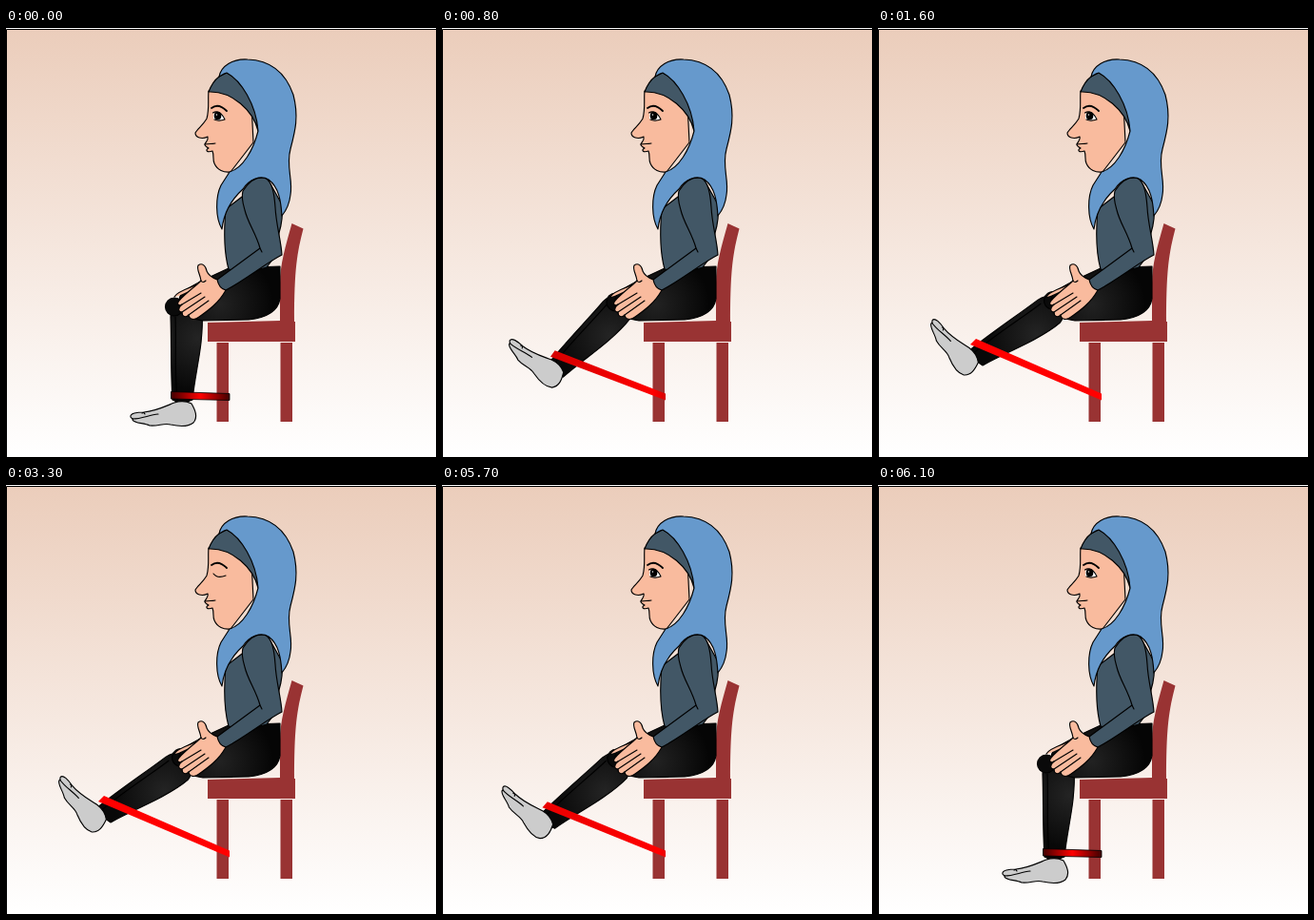
These frames come from a looping animation (452 by 450 pixels, 7.55 s). An HTML page:

```html
<!DOCTYPE html>
<html lang="en">
<head>
<meta charset="utf-8">
<title>Seated knee extension</title>
<style>
  html, body { margin: 0; height: 100%; overflow: hidden; }
  svg { display: block; width: 100vw; height: 100vh; }
  .ink { stroke: #000; stroke-width: 1.15; stroke-linejoin: round; stroke-linecap: round; }
  .bold { stroke-width: 1.8; }
  .line { fill: none; }
  .skin { fill: #f9bb9e; }
  .cloth { fill: #425766; }
  .scarf { fill: #69c; }
  .wood { fill: #933; }
</style>
</head>
<body>
<svg viewBox="0 0 452 450">
  <defs>
    <linearGradient id="sky" x2="0" y2="1">
      <stop stop-color="#ebcdbb"/><stop offset="1" stop-color="#fff"/>
    </linearGradient>
    <radialGradient id="thighShade" gradientUnits="userSpaceOnUse" cx="225" cy="290" r="56">
      <stop stop-color="#222"/><stop offset="1" stop-color="#050505"/>
    </radialGradient>
    <radialGradient id="shinShade" gradientUnits="userSpaceOnUse" cx="202" cy="325" r="56">
      <stop stop-color="#242424"/><stop offset="1" stop-color="#080808"/>
    </radialGradient>
    <linearGradient id="bandShade" gradientUnits="userSpaceOnUse" y1="386" x2="235" y2="386">
      <stop/><stop id="glow" stop-color="#f00"/><stop offset="1"/>
    </linearGradient>
  </defs>

  <rect width="452" height="450" fill="#fff"/>
  <rect y="1" width="452" height="449" fill="url(#sky)"/>
  <path d="M.5 450V1.500H452" fill="none" stroke="#000"/>

  <!-- chair -->
  <g class="wood">
    <path d="M300.500 205L312.500 210.500C306 236 303 252 303 308H304V329H212V309L288 307V268C288 248 294 228 300.500 205Z"/>
    <path d="M221.500 330H234V413H221.500ZM288.500 330H301V413H288.500Z"/>
  </g>

  <!-- moving leg -->
  <g id="shin" class="ink">
    <path fill="url(#shinShade)" d="M186 284C178 285 174 292 173 303C174 330 173 360 175 390C182 394 190 393 196 390C198 370 203 348 205 330C206 320 207 308 206 298C203 288 194 284 186 284Z"/>
    <path class="line" d="M178 303C179 330 177 360 180 390"/>
  </g>
  <circle id="knee" class="ink" cx="177" cy="292.500" r="9.500" fill="#0a0a0a"/>
  <g id="foot" class="ink">
    <path fill="#ccc" d="M177 393C167 397 157 402 145 403C138 403 130 404 131 408C132 410 134 409 133 411C135 415 145 414 151 417C160 418 166 414 173 416C182 418 192 418 197 414C202 408 199 401 195 394C189 391 183 391 177 393Z"/>
    <path class="line" d="M133 410C143 410 150 406 160 405M143 404C144 403 145 403 146 405"/>
  </g>

  <!-- thigh -->
  <path class="ink" fill="url(#thighShade)" d="M288 250L234 252L206 265L188 275C181 280 180 290 185 297C190 302 198 306 207 307L255 306C274 304 286 297 288 284Z"/>
  <path class="skin" d="M177 282C179 278 186 275 194 272L205 267L196 276C188 276 184 281 177 282Z"/>
  <path class="line ink" d="M177 282C179 278 186 275 194 272L205 267"/>

  <!-- torso and arm -->
  <path class="cloth ink" d="M231 190C229 212 229 235 234 253C250 258 264 254 274 251L284 238L287 215C290 205 291 194 290 185L276 160L252 174Z"/>
  <path class="cloth ink" d="M249 171C255 161 263 156 272 157C280 161 282 174 283 188C284 207 289 222 290 238C274 246 252 264 231 275C226 274 222 269 222 264L267 231C263 216 254 204 251 191C249 184 247 178 249 171Z"/>
  <path class="line ink" d="M267 231L269 235"/>

  <!-- hand -->
  <path class="skin ink" d="M222 264C217 262 213 260 211 255C210 249 206 246 202 249C200 253 204 258 205 265C198 272 189 278 182 286C179 289 181 292 185 290C180 294 181 298 185 298C185 303 189 304 192 301C193 306 198 307 203 303C213 296 224 288 231 275C226 274 223 269 222 264Z"/>
  <path class="line ink" d="M185 290L205 278M185 298L209 282M192 301L213 286M205 265C206 267 208 267 210 265"/>

  <!-- head -->
  <path class="skin ink" d="M213 66C212 75 214 85 211 95C207 102 201 106 199 110C199 115 206 117 212 114C213 118 210 119 209 122C209 124 211 125 213 126C209 128 211 131 217 129C219 134 217 138 219 142C222 149 229 152 236 151L260 120L258 80L232 55Z"/>
  <path class="line ink" d="M209 122C213 121 216 122 220 121"/>
  <path class="line ink bold" d="M216 84C221 80 227 82 232 87"/>
  <g id="openEye">
    <path d="M218 90C222 87 228 89 230 95C226 98 220 97 218 95Z" fill="#fff"/>
    <ellipse cx="222.500" cy="92" rx="3.800" ry="4.300"/>
    <path class="line ink" d="M217.500 89C222 86 227 89 230 96M219 96C223 98 227 97 230 96"/>
    <circle cx="221.500" cy="91" r=".7" fill="#fff"/>
  </g>
  <path id="shutEye" class="line ink" d="M218 93C221 97 226 97 231 95"/>
  <path class="cloth ink" d="M213 67C216 59 220 54 224 51L232 47C250 55 264 80 265 108C260 87 238 66 213 67Z"/>
  <path class="scarf ink" d="M224 51C226 40 238 32 254 33C282 34 295 50 302 70C308 93 304 108 299 127C294 145 302 160 299 175C298 184 295 191 290 197C289 182 287 167 276 159C268 154 256 158 249 169C238 179 229 193 227 211C220 199 220 177 226 165L235 151C249 147 260 128 265 108C263 80 247 55 232 47C228 48 226 50 224 51Z"/>

  <path id="band" fill="url(#bandShade)" stroke="#000" stroke-width="1"/>
</svg>
<script>
  const LOOP = 7550, STEP = 50, STEPS = 9, SWING = 55;
  const $ = id => document.getElementById(id);
  const mix = (a, b, p) => a + (b - a) * p;
  const [nearStop, , farStop] = $('bandShade').children;

  const stepsSince = (time, start) =>
    Math.max(0, Math.min(STEPS, Math.floor((time - start) / STEP) + 1));

  // Centre slides on a straight line while the part turns about it.
  function pose(id, [x0, y0], [x1, y1], p) {
    $(id).setAttribute('transform',
      `translate(${mix(x0, x1, p)} ${mix(y0, y1, p)}) rotate(${SWING * p}) translate(${-x0} ${-y0})`);
  }

  function drawBand(p) {
    const x = mix(173.5, 103, p), y = mix(381.5, 326, p);
    const lowX = mix(173.5, 97, p), lowY = mix(389, 332, p);
    $('band').setAttribute('d', `M${x} ${y}L235 383.500V390.500L${lowX} ${lowY}Z`);
    $('band').setAttribute('stroke-opacity', Math.max(0, 0.8 - 2 * p));
    $('bandShade').setAttribute('x1', lowX);
    $('glow').setAttribute('offset', mix(0.5, 1, p));
    const edge = `rgb(${Math.round(mix(64, 255, p))},0,0)`;
    nearStop.setAttribute('stop-color', edge);
    farStop.setAttribute('stop-color', edge);
  }

  function draw(time) {
    const p = (stepsSince(time, 500) - stepsSince(time, 5700)) / STEPS;
    pose('shin', [186, 333], [151, 313], p);
    pose('knee', [177, 292.5], [184, 286], p);
    pose('foot', [165, 404], [80, 332], p);
    drawBand(p);
    const blink = [1450, 3300].some(at => time >= at && time < at + 150);
    $('openEye').style.display = blink ? 'none' : '';
    $('shutEye').style.display = blink ? '' : 'none';
  }

  const start = performance.now();
  function tick() {
    draw((performance.now() - start) % LOOP);
    requestAnimationFrame(tick);
  }
  tick();
</script>
</body>
</html>
```
